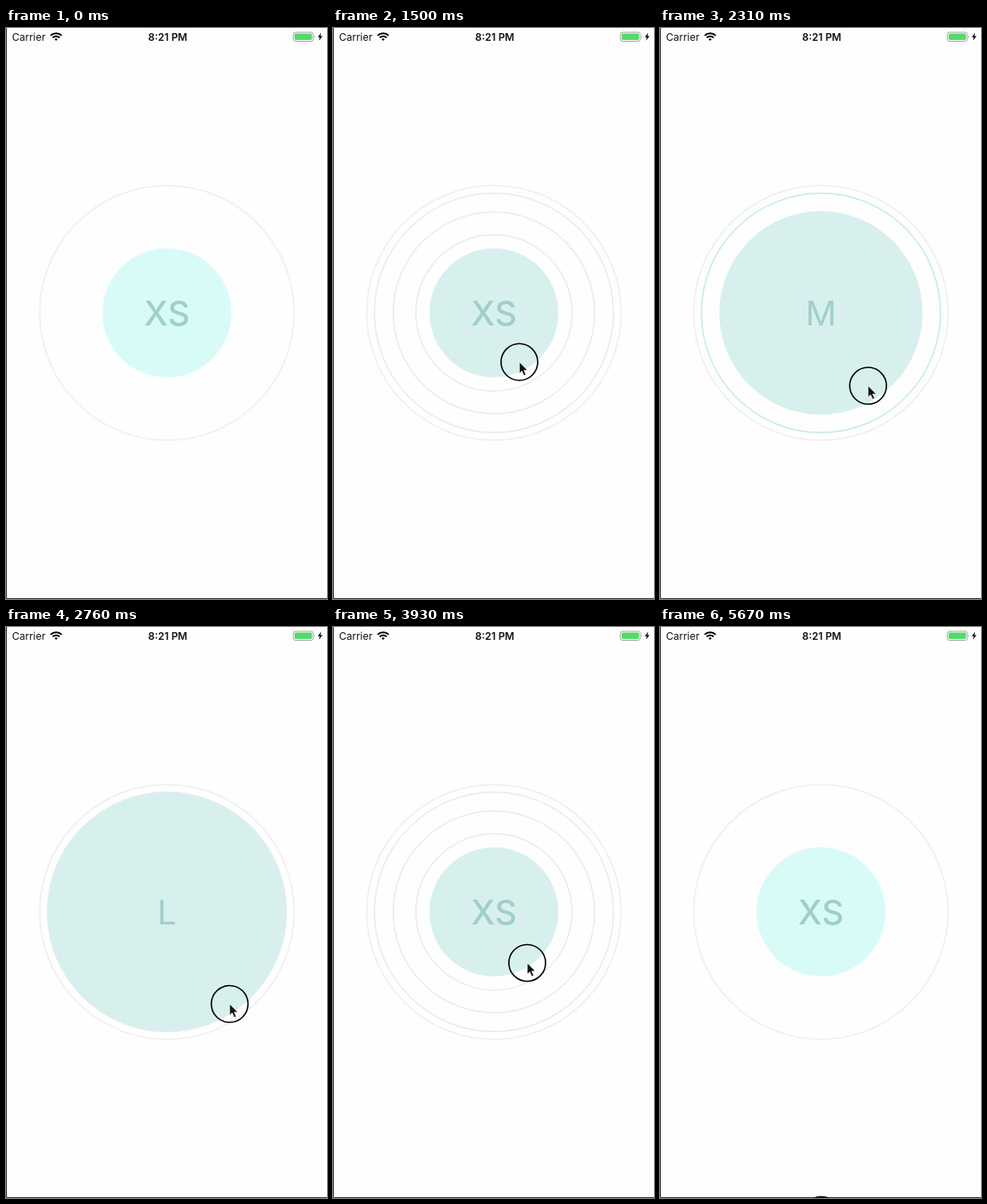
Animation, 376 px wide and 668 px high, one loop 5.7 s. Source, as an HTML page:

```html
<!DOCTYPE html>
<html lang="en">
<head>
<meta charset="utf-8">
<title>Size picker</title>
<style>
  html, body { margin: 0; width: 100%; height: 100%; overflow: hidden; background: #fff; }
  svg { display: block; width: 376px; height: 668px; }
  text { font-family: Inter, Roboto, sans-serif; }
  .ring { fill: none; stroke: #ebebeb; stroke-width: 1.5; }
  .label { font-size: 40px; fill: #a0cfcb; text-anchor: middle; }
  .bar { font-size: 12px; fill: #111; }
  .wifi { fill: none; stroke: #000; stroke-width: 2; }
</style>
</head>
<body>
<svg viewBox="0 0 376 668">
  <rect width="376" height="668" fill="#fefefe"/>

  <text class="bar" x="7" y="14.5">Carrier</text>
  <g class="wifi">
    <path d="M52.3 8.9a9 9 0 0 1 12.9 0"/>
    <path d="M54.7 11.3a5.8 5.8 0 0 1 8.1 0"/>
    <path d="M58.75 15.1l-1.9-2a2.8 2.8 0 0 1 3.8 0z" fill="#000" stroke="none"/>
  </g>
  <text class="bar" x="189.5" y="14.5" text-anchor="middle" font-weight="600">8:21 PM</text>
  <rect x="336.5" y="5" width="23.5" height="10.5" rx="2.6" fill="#fff" stroke="#a3a3a3"/>
  <rect x="338" y="6.5" width="20.5" height="7.5" rx="1.4" fill="#53da69"/>
  <path d="M361.3 8.4q1.6 1.8 0 3.7z" fill="#a3a3a3"/>
  <path d="M369.2 5.6l-4 5.2h2.4l-1 4 4.2-5.4h-2.5z" fill="#000"/>

  <g transform="translate(188.5 333.3)">
    <circle class="ring" r="149" style="stroke:#f1f1f1;stroke-width:2"/>
    <g id="rings">
      <circle class="ring" r="140"/>
      <circle class="ring" r="118"/>
      <circle class="ring" r="91.5"/>
    </g>
    <circle id="disc" r="75.5"/>
    <text id="label" class="label" y="15">XS</text>
  </g>

  <path d="M.5 0V667.5H376" fill="none" stroke="#333"/>

  <g id="cursor">
    <circle r="21.5" fill="none" stroke="#000" stroke-width="1.6"/>
    <path d="M0 0V13.3L3 10.6L5.3 15.8L7.7 14.7L5.4 9.7H9.6Z"
          fill="#111" stroke="#fff" stroke-width=".7"/>
  </g>
</svg>
<script>
  const LOOP = 5700, CX = 188.5, CY = 333.3;
  const $ = id => document.getElementById(id);
  const rings = $('rings'), disc = $('disc'), label = $('label'), cursor = $('cursor');
  const outerRing = rings.firstElementChild;

  const sizes = [
    { name: 'XS', r: 75.5, weight: 500 },
    { name: 'S', r: 92, weight: 400 },
    { name: 'M', r: 119, weight: 400 },
    { name: 'L', r: 140, weight: 400 }
  ];

  // time, x, y
  const path = [
    [30, 230, 429], [600, 215.5, 387], [900, 214.5, 385], [1290, 214.5, 385],
    [1830, 230, 407], [2310, 243.7, 418.5], [2760, 262, 441],
    [3360, 243.5, 413], [3930, 227.5, 393], [4110, 226, 391], [4350, 226, 391],
    [4530, 224, 389], [4740, 224, 389],
    [5010, 206, 475], [5310, 192, 655], [5670, 189, 688]
  ];

  const clamp = v => Math.min(1, Math.max(0, v));
  const ramp = (t, a, b) => clamp((t - a) / (b - a));

  // Slope at a key; zero at the ends and next to a rest
  function slope(i, k) {
    const p = path[i - 1], q = path[i], n = path[i + 1];
    if (!p || !n || p[k] === q[k] || n[k] === q[k]) return 0;
    if ((q[k] - p[k]) * (n[k] - q[k]) < 0) return 0;
    return (n[k] - p[k]) / (n[0] - p[0]);
  }

  function pointAt(t) {
    let i = 0;
    while (i < path.length - 2 && t >= path[i + 1][0]) i++;
    const a = path[i], b = path[i + 1], d = b[0] - a[0];
    const u = clamp((t - a[0]) / d), v = 1 - u;
    return [1, 2].map(k =>
      (1 + 2 * u) * v * v * a[k] + u * v * v * d * slope(i, k) +
      u * u * (3 - 2 * u) * b[k] - u * u * v * d * slope(i + 1, k));
  }

  function draw(now) {
    const t = now % LOOP;
    const [x, y] = pointAt(t);
    cursor.setAttribute('transform', `translate(${x.toFixed(2)} ${y.toFixed(2)})`);
    cursor.style.visibility = t < 30 ? 'hidden' : 'visible';

    const press = ramp(t, 640, 880) - ramp(t, 4760, 5000);
    const dist = Math.hypot(x - CX, y - CY);
    const dragging = t > 900 && t < 4740;
    const found = sizes.findIndex(s => dist <= s.r);
    const i = dragging ? (found < 0 ? sizes.length - 1 : found) : 0;
    const size = sizes[i];

    rings.style.opacity = press;
    outerRing.style.stroke = size.name === 'M' ? '#c6ebe5' : '';
    disc.setAttribute('r', size.r);
    disc.setAttribute('fill', `rgb(${217 - press}, ${251 - 11 * press}, ${247 - 10 * press})`);
    label.textContent = size.name;
    label.style.fontWeight = size.weight;
  }

  const start = performance.now();
  function tick() {
    draw(performance.now() - start);
    requestAnimationFrame(tick);
  }
  tick();
</script>
</body>
</html>
```
